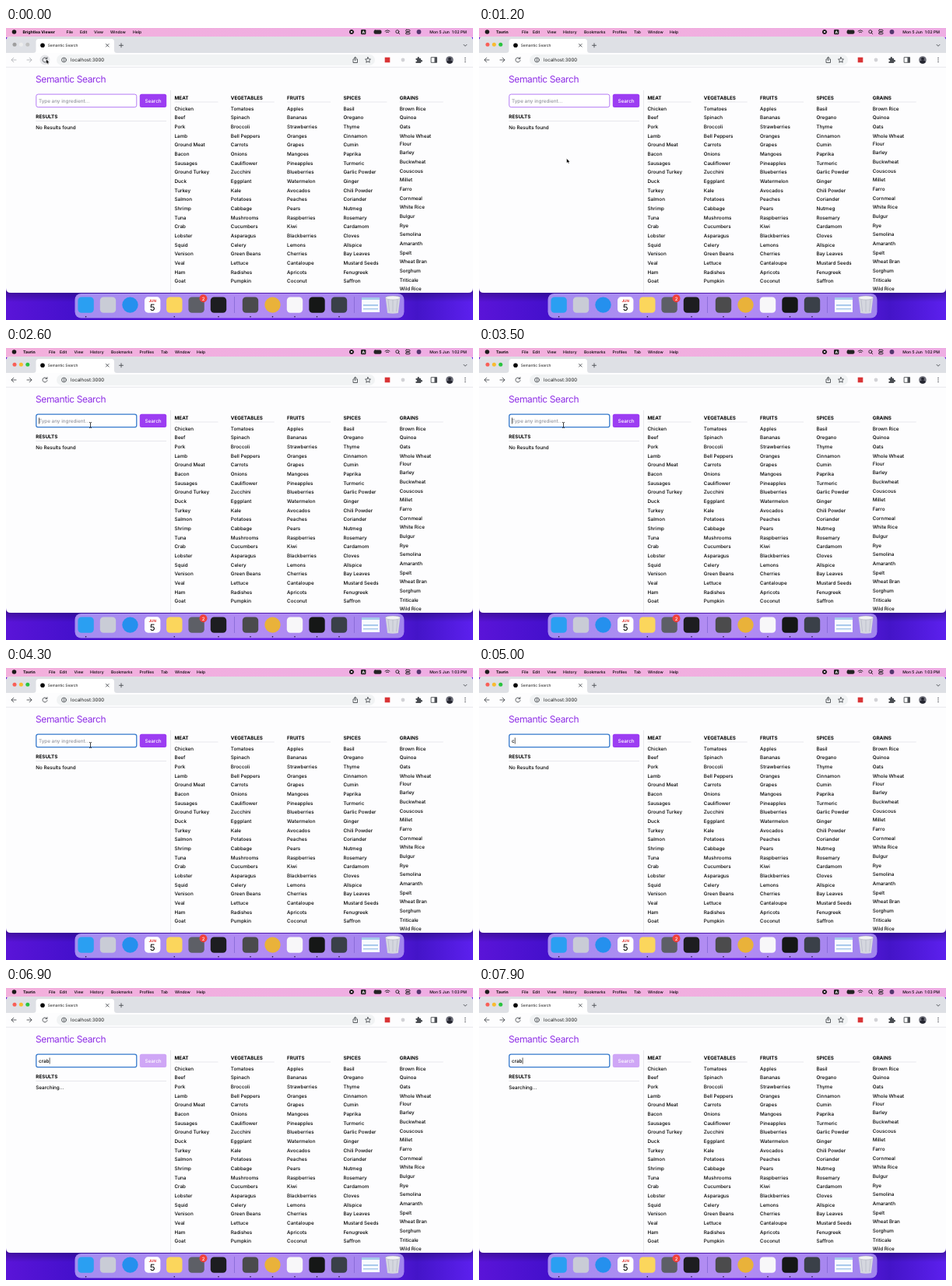
These frames come from a looping animation (600 px wide and 375 px high, 8000 ms). An HTML page:

```html
<!DOCTYPE html>
<html lang="en">
<head>
<meta charset="utf-8">
<title>Semantic Search</title>
<style>
  html, body { margin: 0; width: 100%; height: 100%; overflow: hidden; }
  svg { display: block; width: 100%; height: 100%; }
  text { font: 500 6.3px Inter, Roboto, sans-serif; fill: #000; white-space: pre; text-rendering: geometricPrecision; }
  .bar { font-size: 5.1px; }
  .bold { font-weight: 650; }
  .mid { text-anchor: middle; }
  .icon { fill: none; stroke: #4a4d52; stroke-width: .9; stroke-linecap: round; stroke-linejoin: round; }
  .rule { stroke: #e2e3e7; stroke-width: .8; }
</style>
</head>
<body>
<svg viewBox="0 0 600 375" preserveAspectRatio="none">
  <defs>
    <linearGradient id="wall">
      <stop offset="0" stop-color="#5a14d8"/><stop offset=".15" stop-color="#4410cc"/>
      <stop offset=".5" stop-color="#6a22ea"/><stop offset=".8" stop-color="#5a1be0"/>
      <stop offset=".88" stop-color="#4414c8"/><stop offset="1" stop-color="#5c20ee"/>
    </linearGradient>
    <linearGradient id="top">
      <stop offset="0" stop-color="#f3b0dc"/><stop offset="1" stop-color="#eeade4"/>
    </linearGradient>
    <linearGradient id="glass">
      <stop offset="0" stop-color="#a48df0"/><stop offset=".55" stop-color="#b38cf3"/><stop offset="1" stop-color="#a184ee"/>
    </linearGradient>
    <linearGradient id="shade" x2="0" y2="1">
      <stop offset="0" stop-opacity=".35"/><stop offset="1" stop-opacity="0"/>
    </linearGradient>
  </defs>
  <rect width="600" height="375" fill="url(#wall)"/>
  <rect y="336" width="600" height="16" fill="url(#shade)"/>
  <rect width="600" height="12" fill="url(#top)"/>

  <!-- menu bar -->
  <circle cx="10.5" cy="5" r="2.8" fill="#1a1a1a"/>
  <g id="menuA"></g>
  <g id="menuB"></g>
  <g class="icon" style="stroke:#222">
    <circle cx="444" cy="5" r="2.6" fill="#222"/>
    <rect x="473" y="3" width="9" height="4.2" rx="1.2" fill="#222"/>
    <path d="M487 4q3-2.7 6 0M488.4 5.6q1.6-1.3 3.2 0M504.3 6.3l1.5 1.5"/>
    <circle cx="502.8" cy="4.7" r="2"/>
    <rect x="513.5" y="2.3" width="5.6" height="2.2" rx="1.1"/>
    <rect x="513.5" y="5.7" width="5.6" height="2.2" rx="1.1"/>
  </g>
  <rect x="443" y="4" width="2" height="2" fill="#f3c4e4"/>
  <rect x="456" y="2" width="6.4" height="6.2" rx="1.2" fill="#222"/>
  <text class="mid bold" x="459.2" y="6.9" style="font-size:4.8px;fill:#fff">A</text>
  <circle cx="530.5" cy="5" r="2.9" fill="#55366f"/>
  <text class="bar" id="clock" x="592" y="6.9" text-anchor="end"></text>

  <!-- browser window -->
  <path d="M0 17q0-6 6-6H594q6 0 6 6V334q0 6-6 6H6q-6 0-6-6Z" fill="#fdfdfe"/>
  <path d="M0 32V17q0-6 6-6H594q6 0 6 6V32Z" fill="#dee0e5"/>
  <g id="lights"></g>
  <path d="M35 32q3.5 0 3.5-3.5V17.5q0-3.5 3.5-3.5H135.5q3.5 0 3.5 3.5V28.5q0 3.5 3.5 3.5Z" fill="#fff"/>
  <circle cx="47" cy="22.3" r="2.8" fill="#000"/>
  <text x="53.7" y="24.2" style="font-size:4.8px;fill:#333">Semantic Search</text>
  <path class="icon" d="M128.5 20.5l3.6 3.6m0-3.6l-3.6 3.6M145.5 22.3h5m-2.5-2.5v5M588 21.3l2 2 2-2"/>
  <path class="rule" d="M0 50.3H600"/>
  <rect x="65" y="34" width="409" height="14" rx="7" fill="#f1f3f4"/>
  <circle id="hover" cx="50" cy="41" r="6.5" fill="#e6e7ea"/>
  <g class="icon" id="arrows"><path d="M13 41H7m2.7-2.8L7 41l2.7 2.8M27 41h6m-2.7-2.8L33 41l-2.7 2.8"/></g>
  <path class="icon" d="M52.5 39.2A3 3 0 1 0 53 41.6M52.9 37.6v2h-2"/>
  <g class="icon">
    <circle cx="74.5" cy="41" r="2.9"/><path d="M74.5 40.7v1.7M74.5 39.4v.1"/>
    <path d="M447.5 40h-1.5v4.5h5.5V40h-1.5M448.7 42v-4.7m-1.5 1.4l1.5-1.5 1.5 1.5"/>
    <path d="M465 37.6l1.05 2.25 2.45.3-1.8 1.65.5 2.45-2.2-1.25-2.2 1.25.5-2.45-1.8-1.65 2.45-.3Z"/>
    <rect x="546.5" y="37.7" width="7" height="6.6"/>
  </g>
  <text x="83" y="43.2" style="font-size:6.1px;font-weight:400;fill:#222">localhost:3000</text>
  <rect x="486.7" y="37.7" width="6.6" height="6.6" fill="#d93436"/>
  <circle cx="510" cy="41" r="2.4" fill="#d2d2d6"/>
  <path d="M526.5 39h2q-.3-2 1.3-2t1.3 2h2v2q2-.2 2 1.3t-2 1.3v1.5h-6.6v-2q1.5 0 1.5-1.2t-1.5-1.2Z" fill="#4a4d52"/>
  <rect x="550.5" y="37.7" width="3" height="6.6" fill="#4a4d52"/>
  <circle cx="570" cy="41" r="4.8" fill="#6c6d78"/>
  <path d="M566 43.7q1-2.3 4-2.3t4 2.3q-1.5 2.1-4 2.1t-4-2.1Z" fill="#252630"/>
  <circle cx="570" cy="39.7" r="2" fill="#252630"/>
  <g fill="#4a4d52"><circle cx="590" cy="38.5" r=".75"/><circle cx="590" cy="41" r=".75"/><circle cx="590" cy="43.5" r=".75"/></g>

  <!-- page -->
  <text x="38" y="70" style="font-size:12px;font-weight:400;letter-spacing:-.38px;fill:#8f2fe6">Semantic Search</text>
  <rect id="field" x="38.8" y="85.1" width="129" height="16.6" rx="2.5" fill="#fff"/>
  <text id="query" x="42" y="95.7"></text>
  <rect id="caret" y="89.5" width=".7" height="8" fill="#111"/>
  <rect id="button" x="171.8" y="84.8" width="34.4" height="17.2" rx="2.5"/>
  <text class="mid" x="189" y="95.7" style="fill:#fff">Search</text>
  <text class="bold" x="38.3" y="116.1">RESULTS</text>
  <path class="rule" d="M38.3 119.5H206M211.5 80V340"/>
  <text id="status" x="38.3" y="129.8"></text>
  <g id="lists"></g>

  <!-- dock -->
  <rect x="88.5" y="341" width="423" height="31.6" rx="8" fill="url(#glass)"/>
  <path d="M293.5 345v21M447.5 345v21" stroke="#8467d4" stroke-width=".8"/>
  <g id="dock"></g>
  <rect x="178" y="345.3" width="20.4" height="20.4" rx="4.6" fill="#fff"/>
  <text class="mid bold" x="188.2" y="351.6" style="font-size:4.6px;fill:#e0352f">JUN</text>
  <text class="mid" x="188.2" y="362.8" style="font-size:11.5px;font-weight:400">5</text>
  <circle cx="253.5" cy="347.3" r="5" fill="#f0413c"/>
  <text class="mid" x="253.5" y="349.5" style="font-size:6px;fill:#fff">2</text>
  <rect x="457" y="346" width="23" height="19" fill="#f7fafd"/>
  <path d="M457 346h23v3h-23ZM459 355h19v2h-19ZM459 360h19v1.5h-19Z" fill="#a9c9ec"/>
  <path d="M487.7 346.5h18.6l-2.4 19.5q-6.9 1.6-13.8 0Z" fill="#d5d7df"/>
  <path d="M491 349l1.5 15M497 349v15.5M503 349l-1.5 15" stroke="#b5b8c4" stroke-width=".7"/>
  <ellipse cx="497" cy="346.5" rx="9.5" ry="2.5" fill="#f3f3f5" stroke="#aeb1bd" stroke-width=".6"/>

  <path id="arrow" d="M0 0V6L1.4 4.8 2.4 6.8 3.4 6.3 2.5 4.4H4.4Z" fill="#000" stroke="#fff" stroke-width=".5"/>
  <path id="beam" d="M-1.5-3.5Q0-3.5 0-2.5 0-3.5 1.5-3.5M0-2.5V2.5M-1.5 3.5Q0 3.5 0 2.5 0 3.5 1.5 3.5" fill="none" stroke="#111" stroke-width=".8"/>
</svg>
<script>
const $ = id => document.getElementById(id);
const set = (id, attrs) => { for (const k in attrs) $(id).setAttribute(k, attrs[k]); };
const show = (id, on) => set(id, { visibility: on ? 'visible' : 'hidden' });
const write = (id, s) => { if ($(id).textContent !== s) $(id).textContent = s; };
const label = (x, y, s, cls = '') => `<text x="${x}" y="${y}" class="${cls}">${s}</text>`;

const menu = (names, xs) => names.split(',')
  .map((s, i) => label(xs[i], 6.9, s, i ? 'bar' : 'bar bold')).join('');
$('menuA').innerHTML = menu('Brightlea Viewer,File,Edit,View,Window,Help', [21.5, 77.5, 95, 113, 134, 163]);
$('menuB').innerHTML = menu('Tavrin,File,Edit,View,History,Bookmarks,Profiles,Tab,Window,Help',
  [22, 55, 69, 87.5, 108, 135, 171.5, 199, 217, 245]);

$('lights').innerHTML = ['#f95f57', '#f8bb2f', '#2ac440']
  .map((c, i) => `<circle cx="${11 + i * 8.4}" cy="21.2" r="2.5" fill="${c}"/>`).join('');

const lists = [
  'MEAT,Chicken,Beef,Pork,Lamb,Ground Meat,Bacon,Sausages,Ground Turkey,Duck,Turkey,Salmon,Shrimp,Tuna,Crab,Lobster,Squid,Venison,Veal,Ham,Goat',
  'VEGETABLES,Tomatoes,Spinach,Broccoli,Bell Peppers,Carrots,Onions,Cauliflower,Zucchini,Eggplant,Kale,Potatoes,Cabbage,Mushrooms,Cucumbers,Asparagus,Celery,Green Beans,Lettuce,Radishes,Pumpkin',
  'FRUITS,Apples,Bananas,Strawberries,Oranges,Grapes,Mangoes,Pineapples,Blueberries,Watermelon,Avocados,Peaches,Pears,Raspberries,Kiwi,Blackberries,Lemons,Cherries,Cantaloupe,Apricots,Coconut',
  'SPICES,Basil,Oregano,Thyme,Cinnamon,Cumin,Paprika,Turmeric,Garlic Powder,Ginger,Chili Powder,Coriander,Nutmeg,Rosemary,Cardamom,Cloves,Allspice,Bay Leaves,Mustard Seeds,Fenugreek,Saffron',
  'GRAINS,Brown Rice,Quinoa,Oats,Whole Wheat,Flour,Barley,Buckwheat,Couscous,Millet,Farro,Cornmeal,White Rice,Bulgur,Rye,Semolina,Amaranth,Spelt,Wheat Bran,Sorghum,Triticale,Wild Rice'
];
$('lists').innerHTML = lists.map((list, c) => {
  const [head, ...items] = list.split(','), x = 216.5 + c * 72.3;
  const wrap = items.indexOf('Flour'); // second line of a wrapped entry sits closer
  return label(x, 92.2, head, 'bold') + `<path class="rule" d="M${x} 95H${x + 56}"/>` +
    items.map((s, i) => label(x, 105.5 + i * 11.68 - (wrap > 0 && i >= wrap ? 1.7 : 0), s)).join('');
}).join('');

const tile = (x, fill, round) =>
  `<rect x="${x - 10.2}" y="345.4" width="20.4" height="20.4" rx="${round ? 10.2 : 4.6}" fill="${fill}"/>`;
$('dock').innerHTML =
  [[102.6, '#2a9ff2'], [131, '#c9ccd6'], [159.5, '#2590ee', 1], [216.3, '#fbd65c'], [244.6, '#5d5f66'],
   [273, '#1d1d20'], [314, '#4b4b4c'], [342.5, '#e9b23a', 1], [371, '#f8f7f9'], [399.5, '#151716'], [428, '#3a4048']]
    .map(a => tile(...a)).join('') +
  [102.6, 216.3, 273, 314, 342.5, 371, 399.5, 428]
    .map(x => `<circle cx="${x}" cy="370.8" r=".8" fill="#1b1036"/>`).join('');

// pointer stops: [leave, arrive, x, y]
const stops = [[0, 0, 51.5, 40], [400, 1000, 112.5, 167.5], [1800, 2300, 108.5, 99]];
const pointer = t => {
  let [, , x, y] = stops[0];
  for (const [from, to, px, py] of stops.slice(1)) {
    const p = Math.max(0, Math.min(1, (t - from) / (to - from))), e = p * p * (3 - 2 * p);
    x += (px - x) * e;
    y += (py - y) * e;
  }
  return [x, y];
};

const SWITCH = 300, FOCUS = 2400, MINUTE = 4200, SEARCH = 6300;
const keys = [4900, 5200, 5500, 5800];

function draw(t) {
  const typed = 'crab'.slice(0, keys.filter(k => k <= t).length);
  const active = t >= SWITCH, focused = t >= FOCUS, searching = t >= SEARCH;
  const [x, y] = pointer(t);
  const inField = x > 38 && x < 168 && y > 85 && y < 102;

  show('menuA', !active);
  show('menuB', active);
  set('lights', { style: `filter:${active ? 'none' : 'grayscale(1) brightness(1.25)'}` });
  set('arrows', { style: `stroke:${active ? '#4a4d52' : '#b4b6ba'}` });
  show('hover', Math.hypot(x - 50, y - 41) < 7);
  write('clock', `Mon 5 Jun  1:0${t < MINUTE ? 2 : 3} PM`);

  set('field', { stroke: focused ? '#3579cc' : '#ad6cf4', 'stroke-width': focused ? 1.3 : .9 });
  write('query', typed || 'Type any ingredient...');
  set('query', { style: `fill:${typed ? '#000' : '#92949d'}` });
  const last = typed ? keys[typed.length - 1] : FOCUS;
  set('caret', { x: 42 + (typed ? $('query').getComputedTextLength() + .2 : 0) });
  show('caret', focused && (t - last) % 1000 < 500);

  set('button', { fill: searching ? '#cfa6f6' : '#9c3df2' });
  write('status', searching ? 'Searching...' : 'No Results found');

  for (const id of ['arrow', 'beam']) set(id, { transform: `translate(${x} ${y})` });
  show('arrow', !typed && !inField);
  show('beam', !typed && inField);
}

const start = performance.now();
function tick() {
  draw(Math.floor((performance.now() - start) % 8000 / 100) * 100);
  requestAnimationFrame(tick);
}
tick();
</script>
</body>
</html>
```
